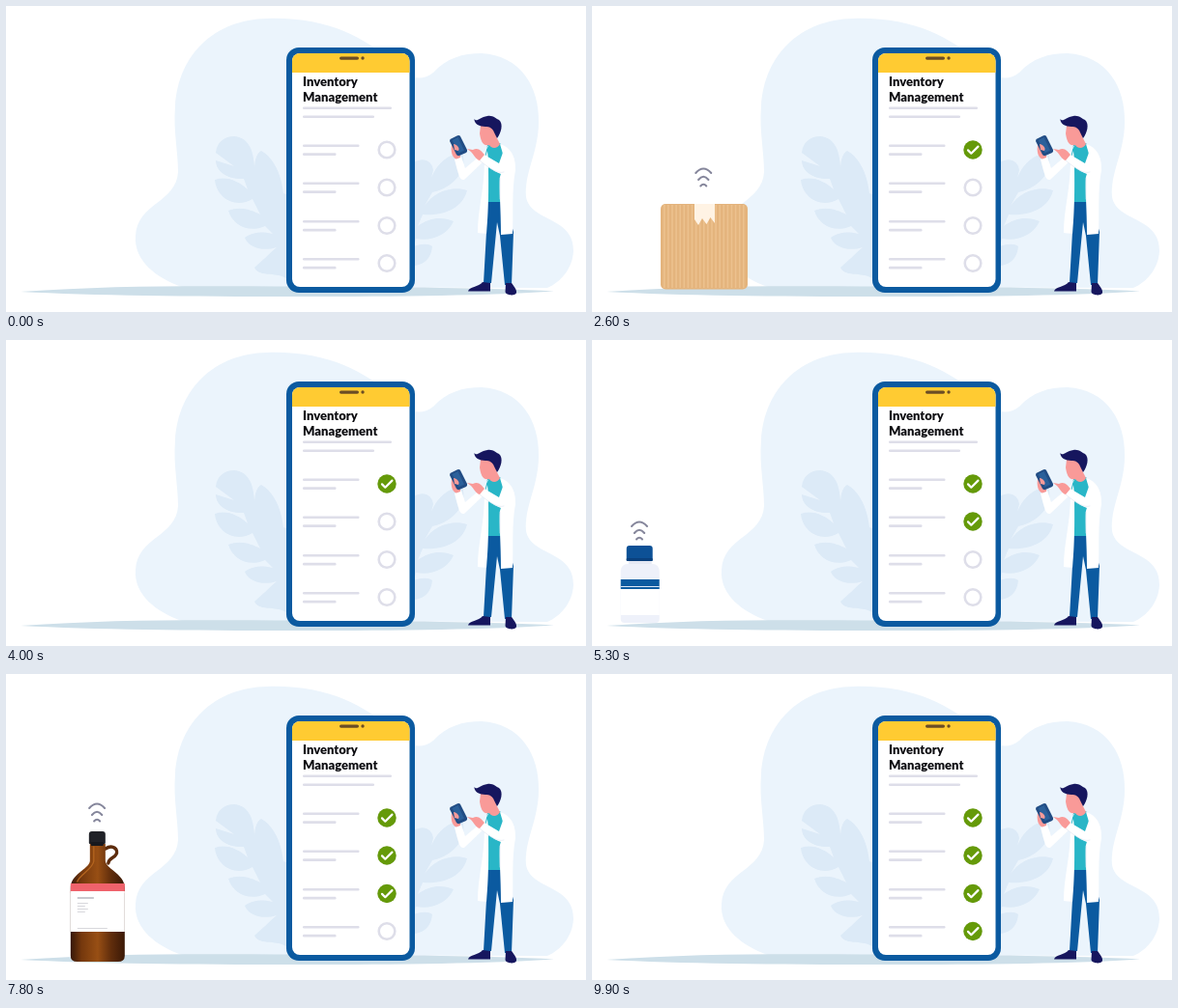
Animation, 600 px wide and 317 px high, one loop 10000 ms. Source, as an HTML page with a canvas:

```html
<!DOCTYPE html>
<html lang="en">
<head>
<meta charset="utf-8">
<title>Inventory Management</title>
<style>
html, body { margin: 0; width: 100%; height: 100%; overflow: hidden; background: #fff; }
canvas { display: block; width: 600px; height: 317px; }
</style>
</head>
<body>
<canvas id="stage"></canvas>
<script>
const W = 600, H = 317, LOOP = 10000, STEP = 100;
const BLUE = '#0b5aa0', NAVY = '#16165e', SKIN = '#f99a98', GREY = '#dedee9';
const canvas = document.getElementById('stage');
const dpr = window.devicePixelRatio || 1;
canvas.width = W * dpr;
canvas.height = H * dpr;
const ctx = canvas.getContext('2d');
ctx.scale(dpr, dpr);

const clamp = v => Math.max(0, Math.min(1, v));
const easeQuad = p => p < .5 ? 2 * p * p : 1 - 2 * (1 - p) ** 2;
const easeCubic = p => p < .5 ? 4 * p ** 3 : 1 - 4 * (1 - p) ** 3;

function shape(d, fill) {
  ctx.fillStyle = fill;
  ctx.fill(new Path2D(d));
}
function stroke(d, color, width) {
  ctx.strokeStyle = color;
  ctx.lineWidth = width;
  ctx.lineCap = ctx.lineJoin = 'round';
  ctx.stroke(new Path2D(d));
}
function box(x, y, w, h, r, fill) {
  ctx.fillStyle = fill;
  ctx.beginPath();
  ctx.roundRect(x, y, w, h, r);
  ctx.fill();
}
function disc(x, y, r, fill) {
  ctx.fillStyle = fill;
  ctx.beginPath();
  ctx.arc(x, y, r, 0, Math.PI * 2);
  ctx.fill();
}

function backdrop() {
  shape(`M182 291 C156 282 132 264 134 238 C136 204 176 204 178 172
    C178 150 173 130 175 104 C178 50 216 14 270 13 C330 11 372 32 398 58
    C414 74 428 80 442 69 C456 54 472 49 492 49 C532 51 552 84 551 120
    C551 152 536 172 538 198 C543 224 588 218 587 254 C586 272 574 286 560 292 Z`, '#ebf4fc');
  const leaf = '#dceaf7';
  shape(`M236 135 C250 136 256 148 257 166 L260 186 C255 168 257 154 264 150
    C277 157 285 175 287 194 L292 196 V284 C282 274 262 282 257 271
    C265 264 273 256 280 250 C268 254 252 252 247 240 C256 233 268 234 276 236
    L268 228 C250 236 234 226 230 212 C242 207 254 211 263 216
    L255 200 C238 210 218 200 216 180 C228 176 240 181 250 190
    L246 179 C230 180 217 172 217 160 L236 166 L217 152 C218 141 226 135 236 135 Z`, leaf);
  shape(`M422 162 C431 156 441 160 442 170 L437 190 C440 168 455 153 472 152
    C478 168 465 188 441 193 L433 207 C443 192 462 186 477 191
    C473 208 455 218 431 216 L426 228 C438 219 451 218 463 223
    C456 238 440 244 424 241 L422 249 C430 246 437 246 441 249
    C440 262 432 268 422 269 Z`, leaf);
  shape(`M15 296 C110 289 200 290 300 290.5 C410 291 500 292 567 295.5
    C500 300 410 301 300 301 C190 301 90 300 15 296 Z`, '#cddfe9');
}

function freezer(x) {
  ctx.save();
  ctx.translate(x - 235, 0);
  box(211, 286, 13, 5.5, 2, '#85879b');
  box(246, 286, 13, 5.5, 2, '#85879b');
  box(202, 163, 66, 126, [4, 4, 5, 5], '#efecf8');
  box(262, 168, 6, 121, [0, 0, 5, 0], '#e7e3f3');
  box(202, 162, 66, 6, [4, 4, 0, 0], '#8a68cf');
  stroke('M203 175 H221 V169', '#fff', 1);
  ctx.translate(235, 220.5);
  for (let i = 0; i < 4; i++) {
    stroke('M0 0 V-14 M-4.5 -12.5 L0 -8 L4.5 -12.5', BLUE, 2);
    disc(0, -14.5, 1.5, BLUE);
    stroke('M0 0 L4 -4', BLUE, 1.8);
    disc(9, -9, 1.5, BLUE);
    ctx.rotate(Math.PI / 2);
  }
  ctx.restore();
}

function parcel(x) {
  ctx.save();
  ctx.translate(x - 146, 0);
  box(101, 205, 90, 88.5, 5, '#e4b47d');
  for (let i = 0; i < 21; i++) box(104 + i * 4.1, 206, 1.6, 86, 0, '#ecc18e');
  shape('M136 205 H157 V225 L152.5 219 L148.5 226 L144 220 L140 227 L136 221 Z', '#fff3e4');
  ctx.restore();
}

function vial(x) {
  ctx.save();
  ctx.translate(x - 48, 0);
  box(36, 226, 24, 9, 0, '#e5e9f4');
  box(28, 232, 40, 61, [7, 7, 4, 4], '#eef1fa');
  box(28, 249, 40, 36, 0, '#fff');
  box(28, 248, 40, 10, 0, BLUE);
  box(28, 255, 40, 1, 0, '#dce8f7');
  box(34, 213, 27, 16, [3, 3, 1, 1], '#0d5196');
  box(34, 226, 27, 3, 1, '#0a407d');
  ctx.restore();
}

function jug(x) {
  ctx.save();
  ctx.translate(x - 96, 0);
  stroke('M104 181 C112 176 118 182 115 187 C113 191 108 190 107 196', '#5d2c0c', 3.4);
  const amber = ctx.createLinearGradient(68, 0, 124, 0);
  [[0, '#351708'], [.2, '#75380d'], [.5, '#984f14'], [.75, '#602d0c'], [1, '#3b1907']]
    .forEach(([at, color]) => amber.addColorStop(at, color));
  shape(`M88 176 H104 V194 C106 203 124 207 124 222 V292 Q124 298 117 298
    H75 Q68 298 68 292 V222 C68 207 86 203 88 194 Z`, amber);
  stroke('M92 179 V194 C91 202 77 208 75 215', '#b4651f', 1.3);
  box(68, 217, 56, 10, 0, '#ef626b');
  box(68, 225, 56, 42, 0, '#fff');
  box(75, 231, 17, 2, 0, '#c9c9cf');
  [237, 240, 243, 246].forEach((y, i) => box(75, y, 11 - i % 2 * 3, 1, 0, '#d7d7dc'));
  box(75, 263, 31, 1, 0, '#d7d7dc');
  box(87, 163, 17, 13, [3, 3, 1, 1], '#202127');
  box(89, 174, 13, 4, 1, '#17181d');
  ctx.restore();
}

function signal(x, top, age) {
  const alpha = clamp((age - 100) / 150) * clamp((800 - age) / 180);
  if (!alpha) return;
  ctx.save();
  ctx.globalAlpha = alpha;
  ctx.translate(x - .7, top - 13 - age * .04);
  [[8, 0, 5], [5.2, 8.5, 3.5], [3, 16.5, 2]].forEach(([w, y, sag]) =>
    stroke(`M${-w} ${y + sag} Q0 ${y - sag * .8} ${w} ${y + sag}`, '#85869b', 2));
  ctx.restore();
}

const items = [
  { draw: freezer, top: 162, start: 0, leave: 840, span: 710, check: 1200, row: 149 },
  { draw: parcel, top: 205, start: 2000, leave: 1080, span: 1030, check: 2050, row: 188 },
  { draw: vial, top: 213, start: 5000, leave: 840, span: 700, check: 1200, row: 227.5 },
  { draw: jug, top: 163, start: 7400, leave: 840, span: 700, check: 1200, row: 266.5 }
];

function moveItem(item, t) {
  const age = t - item.start;
  if (age <= 0 || age >= item.leave + item.span) return;
  const x = -60 + 176 * easeQuad(clamp(age / 530))
    + 240 * easeCubic(clamp((age - item.leave) / item.span));
  item.draw(x);
  signal(x, item.top, age);
}

function phone(t) {
  box(290, 43, 133, 254, 13, BLUE);
  box(296, 49, 121.5, 242, 8, '#fff');
  box(296, 49, 121.5, 20, [8, 8, 0, 0], '#ffcb32');
  box(345, 52.5, 20, 3.2, 1.6, '#6b4d25');
  disc(369, 54, 1.7, '#6b4d25');
  ctx.fillStyle = '#0c0c10';
  ctx.font = '900 13px Lato, sans-serif';
  ctx.fillText('Inventory', 307, 83.3);
  ctx.fillText('Management', 307, 99);
  const line = (y, w) => box(307, y - 1.3, w, 2.6, 1.2, GREY);
  line(105.7, 92);
  line(114.7, 74);
  for (const { row, start, check } of items) {
    line(row - 4.3, 58.5);
    line(row + 4.6, 34.5);
    ctx.strokeStyle = GREY;
    ctx.lineWidth = 2.6;
    ctx.beginPath();
    ctx.arc(394, row, 8.3, 0, Math.PI * 2);
    ctx.stroke();
    const shown = clamp((t - start - check) / 500);
    if (!shown) continue;
    ctx.save();
    ctx.globalAlpha = shown;
    ctx.translate(394, row);
    disc(0, 0, 9.7, '#659a09');
    ctx.setLineDash([17 * shown, 20]);
    stroke('M-5 .4 L-1.7 3.7 L5.4 -3.4', '#fff', 2.2);
    ctx.restore();
  }
}

function person() {
  // legs and shoes
  shape('M497 198 H514 L525 234 L523 289 H516 L511 238 L508 224 L502 287 H494 L497 234 Z', BLUE);
  shape('M493 286 L501 287 V295.5 H478 C479 291 489 291 493 286 Z', NAVY);
  shape('M517 287 H523 C526 291 530 296 527 298.5 C523 300.5 517 299 516.5 296 Z', NAVY);
  // shirt and coat
  shape('M498 144 L511 142 L517 152 L514 203 H497 L496 154 Z', '#29b6c7');
  shape('M500 144 C495 148 494 153 495 160 L474 180 C469 181 468 174 464 159 L471 156 L475 168 L494 152 Z', '#fff');
  shape('M498 150 L495 160 C495 190 488 210 488 235 L497 236 C500 205 499 176 499 160 Z', '#fff');
  shape('M511 143 C522 146 527 155 527 170 C523 190 525 216 524 236 L512 237 C512 210 510 190 511 177 L516 160 Z', '#fff');
  shape('M515 149 C524 150 528 159 526 168 C521 179 511 177 490 160 L493 153 L510 163 Z', '#fff');
  stroke('M490 160 C502 170 510 174 515 172 M511 178 V200', '#e3e9f3', .7);
  // head
  shape('M491 124 C492 119 507 118 510 127 L507 135 L511 143 C508 149 501 147 500 144 C493 146 491 139 490 132 Z', SKIN);
  shape('M484.5 117 C487 121 490 115 498 114 C504 113 507 117 510 118 C515 122 512 132 508 137 L505 131 C503 126 500 125 496 125 C490 125 484 122 484.5 117 Z', NAVY);
  // hands and handset
  shape('M461 144 C460 150 461 157 466 158.5 L470 157 V149 Z', SKIN);
  shape('M459.5 138 L467 134.3 Q469 133.5 470 135 L477 149 Q477.5 151 476 152 L469 155 Q467 155.5 466 154 L459 140 Z', '#214c84');
  shape('M461.5 139 L467.5 136 L474 149.5 L468.5 152.3 Z', '#2b609a');
  shape('M463 143 C466 143 470 147 468 150 L464 149 Z', SKIN);
  shape('M477 148 L483 149 C489 146 492 151 495 154 L490 160 C486 159 484 154 481 151 Z', SKIN);
}

function frame(now) {
  const t = Math.floor(now % LOOP / STEP) * STEP;
  ctx.fillStyle = '#fff';
  ctx.fillRect(0, 0, W, H);
  backdrop();
  items.forEach(item => moveItem(item, t));
  phone(t);
  person();
}

const began = performance.now();
function tick() {
  frame(performance.now() - began);
  requestAnimationFrame(tick);
}
tick();
</script>
</body>
</html>
```
